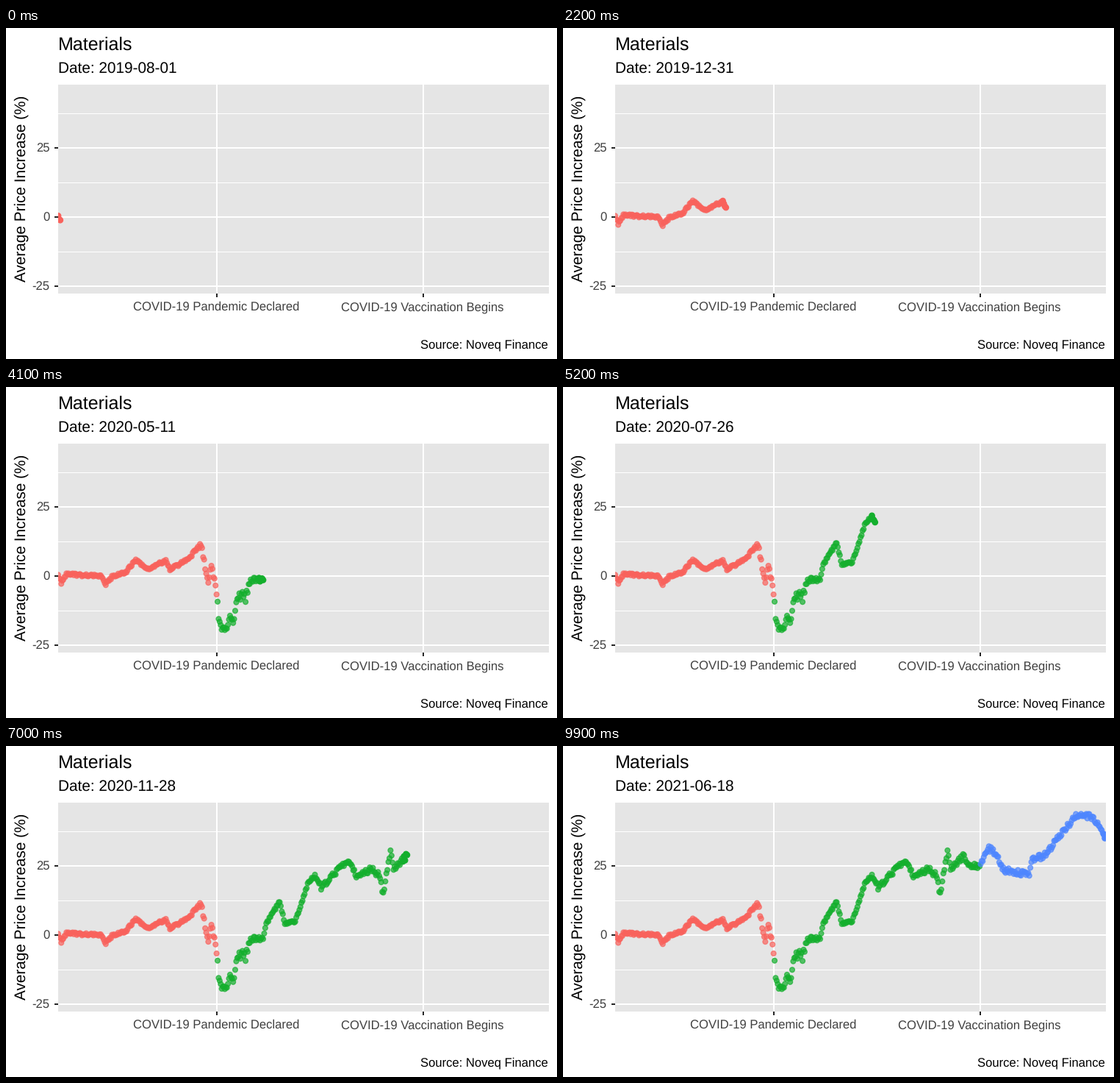
Animation of 750 by 450 pixels, one loop 10 s. Source, as a matplotlib script:

```python
import matplotlib.pyplot as plt
import numpy as np
from matplotlib.animation import FuncAnimation

W, H, DPI = 750, 450, 100
FRAMES, STEP = 100, 100
LEFT, RIGHT, TOP, BOTTOM = 71, 739, 77, 361
ZERO_Y, PX_PER_PCT = 257, 3.75
PT = 72 / DPI
BASE = 20.8  # body text height in pixels
AXIS_GREY = "#404040"

plt.rcParams.update({"font.family": "Liberation Sans", "text.hinting": "none"})

START, SPAN = np.datetime64("2019-08-01"), 687
N = 475  # trading days
PANDEMIC, VACCINE = 153, 352.5
index = np.arange(N)
slot = np.round(index / (N - 1) * (FRAMES - 1)).astype(int)

# Turning points of the price: (trading day, percent)
TURNS = [(0, 0), (3, -2.4), (8, .6), (25, .2), (42, 0), (46, -3), (52, -.3),
         (65, 1.2), (75, 6), (86, 2.5), (104, 5.6), (108, 2.4), (126, 6.2),
         (138, 11.6), (145, -3.5), (148, 4), (153, -6.3), (156, -18), (162, -20.5),
         (166, -13.5), (169, -18.5), (174, -6.5), (181, -8), (186, -1), (198, -1.5),
         (201, 4), (214, 12.2), (219, 4), (229, 4.8), (242, 19.5), (248, 21.4),
         (254, 17.4), (275, 25.2), (283, 26.5), (288, 20.4), (302, 24), (310, 21.6),
         (314, 15), (321, 30.5), (324, 24), (337, 28.8), (341, 25.5), (352, 25),
         (361, 31.4), (367, 29.8), (375, 23.7), (400, 22), (403, 27.8), (414, 28.5),
         (445, 43.3), (461, 43), (474, 35.3)]
rng = np.random.default_rng(4)
panic = np.exp(-((index - 166) / 22) ** 2)
swing = .5 + 1.5 * panic + .5 * (index > 250)
price = np.interp(index, *zip(*TURNS)) + swing * rng.uniform(-1, 1, N)
points = np.column_stack([index, price])

PHASES = np.array([(249, 98, 92), (20, 175, 45), (78, 134, 255)]) / 255
colors = PHASES[(index > PANDEMIC).astype(int) + (index > VACCINE)]
faded = np.column_stack([colors, np.full(N, .7)])

fig = plt.figure(figsize=(W / DPI, H / DPI), dpi=DPI, facecolor="white")
ax = fig.add_axes([LEFT / W, 1 - BOTTOM / H, (RIGHT - LEFT) / W, (BOTTOM - TOP) / H],
                  facecolor="#E5E5E5")
ax.set(xlim=(0, N - 1),
       ylim=((ZERO_Y - BOTTOM) / PX_PER_PCT, (ZERO_Y - TOP) / PX_PER_PCT))
ax.spines[:].set_visible(False)
ax.set_axisbelow(True)
ax.set_xticks([PANDEMIC, VACCINE])
ax.set_yticks([-25, 0, 25])
ax.set_yticks([-12.5, 12.5, 37.5], minor=True)
ax.tick_params(length=5.2 * PT, width=2 * PT, color="#252525",
               labelleft=False, labelbottom=False)
ax.tick_params(which="minor", length=0)
ax.grid(color="white", lw=2 * PT)
ax.grid(which="minor", color="white", lw=1 * PT)


def label(x, y, text, size=BASE, color="black", **kw):
    return fig.text(x / W, 1 - y / H, text, size=size * PT, color=color,
                    va="baseline", **kw)


small = BASE * .8
label(LEFT, 30, "Materials", BASE * 1.2)
subtitle = label(LEFT, 61, "")
label(26.5, 218.5, "Average Price Increase (%)", rotation=90,
      rotation_mode="anchor", ha="center")
label(737.6, 435.6, "Source: Noveq Finance", small, ha="right")
for pct in (-25, 0, 25):
    label(59.6, ZERO_Y + 6 - pct * PX_PER_PCT, str(pct), small, AXIS_GREY, ha="right")
label(286.5, 384, "COVID-19 Pandemic Declared", small, AXIS_GREY, ha="center")
label(567, 384, "COVID-19 Vaccination Begins", small, AXIS_GREY, ha="center")


def dots(rgb, size, z):
    return ax.scatter(*points.T, s=(size * PT) ** 2, lw=1.3 * PT,
                      facecolors=rgb, edgecolors=rgb, zorder=z)


past = dots(faded, 6.8, 3)
head = dots(colors, 7.4, 4)


def draw(frame):
    first, last = np.searchsorted(slot, [frame, frame + 1])
    past.set_offsets(points[:first])
    head.set_offsets(points[first:last])
    head.set_color(colors[first:last])
    subtitle.set_text(f"Date: {START + frame * SPAN // (FRAMES - 1)}")
    return past, head, subtitle


anim = FuncAnimation(fig, draw, frames=FRAMES, interval=STEP, repeat=True,
                     repeat_delay=0)
plt.show()
```
